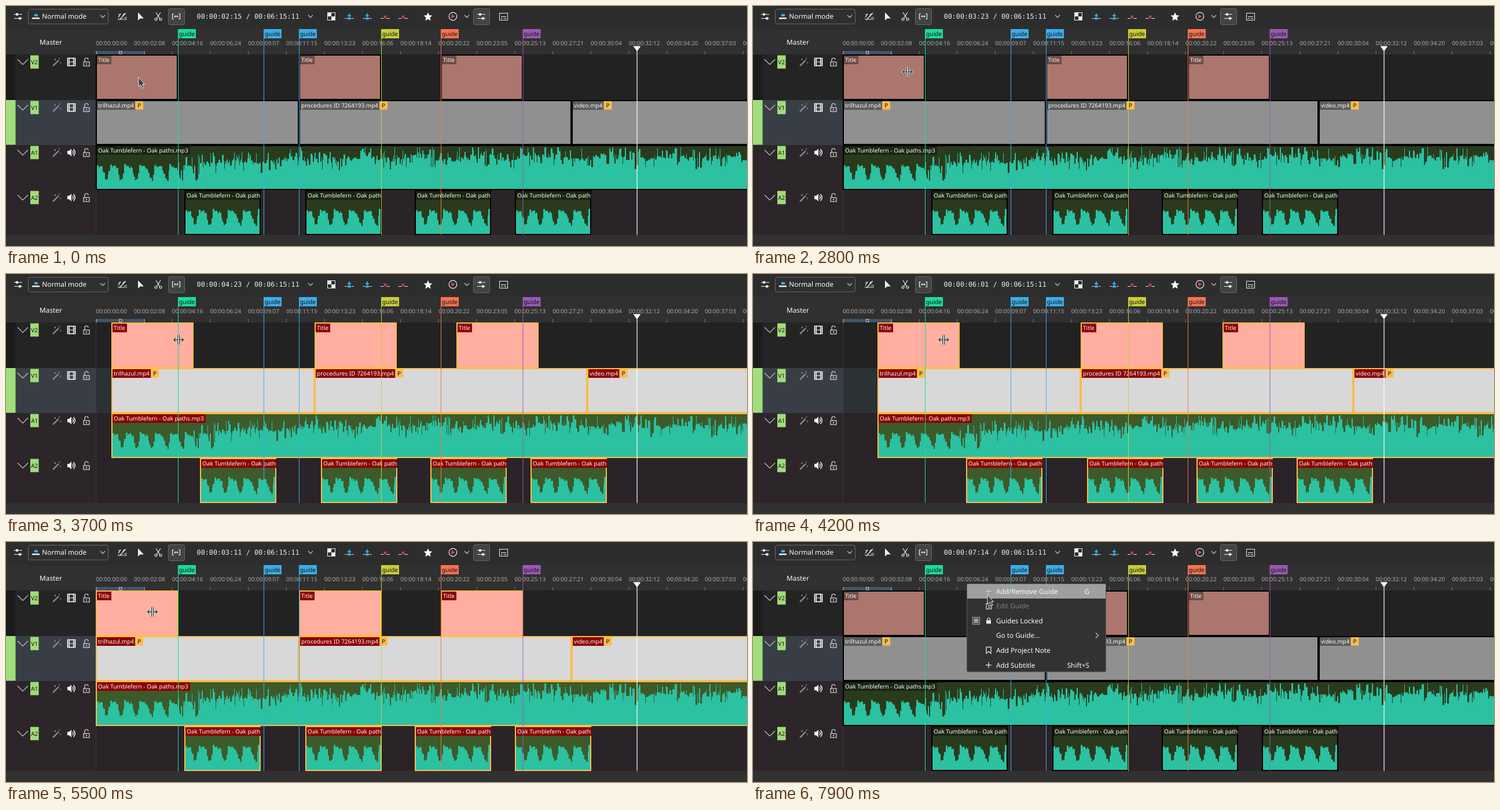
An HTML page for the animation above (8 s loop, 1280 by 416 pixels).

```html
<!DOCTYPE html>
<html lang="en">
<head>
<meta charset="utf-8">
<title>Timeline spacer tool</title>
<style>
html, body { margin: 0; width: 100%; height: 100%; overflow: hidden; background: #2d2d2d; }
#stage { display: block; width: 1280px; height: 416px; }
text { font-family: "Noto Sans", "Open Sans", sans-serif; font-size: 10px; fill: #fcfcfc; text-rendering: geometricPrecision; white-space: pre; }
.ui { font-size: 11.8px; }
.mono { font-family: "DejaVu Sans Mono", "Noto Sans Mono", monospace; font-size: 11.75px; fill: #eee; }
.dark { fill: #111; }
.line { fill: none; stroke: #eee; stroke-width: 1.2; }
.ruler text { fill: #a9a9a9; }
.edge { fill: none; stroke: #000; stroke-width: 2; }
.title { fill: #ab766d; }
.video { fill: #909090; }
.audio { fill: #293b1c; }
.tag { fill: #000; fill-opacity: .36; }
.wave { fill: #2bc1a1; }
.sel .edge { stroke: #fdbc4b; }
.sel .title { fill: #ffae9f; }
.sel .video { fill: #d8d8d8; }
.sel .audio { fill: #3d5a2a; }
.sel .tag { fill: #8b0000; fill-opacity: 1; }
</style>
</head>
<body>
<svg id="stage" viewBox="0 0 1280 416">
  <g id="back"></g>
  <g id="clips"></g>
  <g id="front"></g>
  <g id="menu"></g>
  <g id="arrow"><path d="M.5 .5V17L4.4 13.6L7.3 19.6L9.7 18.4L7 12.6H11Z" fill="#3d3d3d" stroke="#eee" stroke-linejoin="round"/></g>
  <g id="split"></g>
</svg>
<script>
const $ = id => document.getElementById(id);
const rect = (x, y, w, h, fill, more = '') => `<rect x="${x}" y="${y}" width="${w}" height="${h}" fill="${fill}" ${more}/>`;
const text = (x, y, s, cls = '', more = '') => `<text x="${x}" y="${y}" class="${cls}" ${more}>${s}</text>`;
const line = (d, color = '#eee', w = 1.2) => `<path d="${d}" class="line" style="stroke:${color};stroke-width:${w}"/>`;
const shape = (d, fill = '#eee') => `<path d="${d}" fill="${fill}"/>`;
const at = (x, y, s) => `<g transform="translate(${x} ${y})">${s}</g>`;
const chevron = (x, y, r = 4) => line(`M${x - r} ${y - r / 2}l${r} ${r}l${r} ${-r}`, '#ccc');
const two = n => String(n).padStart(2, '0');
const timecode = f => `00:00:${two(Math.floor(f / 25))}:${two(f % 25)}`;

// Toolbar
const sliders = line('M-7-3.5H7M-7 3.5H7') + rect(-4, -5.5, 4, 4, '#eee') + rect(1, 1.5, 4, 4, '#eee');
const checked = x => rect(x + .5, 4.5, 28, 28, '#434343', 'rx="3" stroke="#666"');
const arrowDown = color => line('M-7.5 3.5H-4M4 3.5H7.5') + rect(-3, 2, 6, 3.5, color) + shape('M-4-2H4L0 1.5Z', color) + rect(-1, -5, 2, 4, color);
const redCut = line('M-8 3.5H-3M3 3.5H8') + line('M-2.5-1.5L2.5 3.5M2.5-1.5L-2.5 3.5', '#e04a5a', 1.5);
const spacer = line('M-4-4.5H-6.5V4.5H-4M4-4.5H6.5V4.5H4M-2.5 0H2.5') + shape('M-4 0l2.5-2.5v5zM4 0l-2.5-2.5v5z');

function toolbar() {
  return at(21, 18, sliders)
    + rect(38.5, 5.5, 138, 25.5, '#2f2f2f', 'rx="3" stroke="#6b6b6b"')
    + rect(45, 20, 13, 2.5, '#eee') + rect(49, 14, 6, 4, '#3daee9')
    + text(62.3, 22.3, 'Normal mode', 'ui') + chevron(167, 18)
    + at(201, 18, line('M-8 5H8M-7 2L-3-5M-1 2L3-5M-5 6L6-6M-7-3H-3M3 2H8'))
    + at(228, 11, shape('M0 0V14L4 10.5H10Z'))
    + at(263, 18, line('M-4-7L3 4M4-7L-3 4') + '<circle cx="-4" cy="5" r="2" class="line"/><circle cx="4" cy="5" r="2" class="line"/>')
    + checked(280) + rect(280, 4, 29, 29, '#b0b0b0', 'id="hover" rx="3"') + at(294, 18, spacer)
    + `<text id="clock" class="mono" x="329.6" y="22.4"></text>` + text(414.8, 22.4, '/ 00:06:15:11', 'mono')
    + chevron(526, 18)
    + rect(555.5, 11.5, 13, 13, 'none', 'stroke="#eee"') + shape('M555 11h7v7h-7zM562 18h7v7h-7z')
    + at(593, 18, arrowDown('#3daee9')) + at(624, 18, arrowDown('#3daee9'))
    + at(655, 18, redCut) + at(686, 18, redCut)
    + at(729, 18.5, shape('M0-7.5L2.2-2.5L7.4-2L3.5 1.6L4.6 7L0 4.2L-4.6 7L-3.5 1.6L-7.4-2L-2.2-2.5Z', '#fff'))
    + '<circle cx="772" cy="18" r="6.8" class="line"/>' + shape('M769.5 14.5v7l6-3.5z', '#e04a5a') + chevron(796, 18)
    + checked(807) + at(821, 18, sliders)
    + rect(852.5, 12.5, 14, 12, 'none', 'stroke="#eee"') + line('M855 18.5H864M855 21.5H858M860 21.5H864');
}

// Track headers
const wand = line('M-6 7L4-3', '#8f8f8f', 2.4) + line('M-2-6v3M7 0v3M6-7l-2 2M-4-4h3', '#8f8f8f');
const film = rect(-6.5, -6.5, 13, 13, 'none', 'stroke="#fcfcfc" stroke-width="1.6"') + line('M-3.5-6V6M3.5-6V6M-6-3h2M-6 0h2M-6 3h2M4-3h2M4 0h2M4 3h2M-3 0H3', '#fcfcfc', 1.2);
const speaker = shape('M-7-3H-4L0-6.5V6.5L-4 3H-7Z', '#fcfcfc') + line('M2-3Q4.5 0 2 3M3.5-6Q9 0 3.5 6', '#fcfcfc', 1.4);
const lock = rect(-5, 0, 10, 7, 'none', 'stroke="#ddd" stroke-width="1.2"') + line('M-3 0V-4Q-3-7 0-7T3-4', '#ddd') + rect(-.7, 2, 1.5, 3, '#ddd');

const tracks = [
  ['V2', 84, 79, '#242424', '#222222', 97],
  ['V1', 163, 78, '#393e46', '#2a3235', 176],
  ['A1', 241, 78, '#2c2529', '#2a2328', 254],
  ['A2', 319, 78, '#2c2529', '#2a2328', 332],
];

function header([name, y, h, head, body, mid]) {
  return rect(0, y, 155, h, head) + rect(155, y, 1125, h, body)
    + rect(42, mid - 11.5, 14.5, 23, '#9fdd79') + text(49.2, mid + 3.5, name, 'dark', 'text-anchor="middle"')
    + line(`M20 ${mid - 4.5}l9 9l9-9`, '#c4c4c4')
    + at(87, mid, wand) + at(113, mid, name[0] === 'V' ? film : speaker) + at(139, mid, lock);
}

const step = 65.75;
function ruler() {
  let s = '';
  for (let i = 0; i < 18; i++) {
    const x = 155.5 + i * step;
    s += rect(x - .5, 78, 1, 6, '#777') + text(x - .3, 67.8, timecode(i * 58));
  }
  return `<g class="ruler">${s}</g>` + rect(156, 78, 84, 5.5, '#40566a') + rect(156, 78, 1, 6, '#6f93b5') + rect(238.5, 78, 1.5, 6, '#6f93b5')
    + rect(195.5, 78.5, 4.5, 4.5, '#40566a', 'stroke="#bcc8d2"');
}

$('back').innerHTML = rect(0, 0, 1280, 416, '#2d2d2d') + rect(0, 40, 1280, 44, '#303030') + toolbar()
  + text(77.5, 66.8, 'Master', 'ui', 'text-anchor="middle"') + tracks.map(header).join('')
  + rect(0, 84, 16.5, 79, '#1b1b1b') + rect(0, 163, 16.5, 77.5, '#a0df7c')
  + rect(155, 84, 1, 313, '#3c3a3c') + ruler() + rect(0, 397, 1280, 19, '#313131');

// Waveform: slow pulses with slanted notches first, then a dense spiky passage
function pulse(x) {
  const p = ((x + 4) % 26) / 26;
  if (p < .5) return 42 - p * 8;
  if (p < .72) return 38 - (p - .5) * 95;
  if (p < .88) return 17;
  return 17 + (p - .88) * 190;
}

function wave(width, bottom) {
  let seed = 4711, d = `M0 ${bottom}`;
  const rnd = () => (seed = seed * 16807 % 2147483647) / 2147483647;
  for (let x = 0; x < width;) {
    const r = rnd(), n = rnd() - .5;
    let h = pulse(x) + n * 5;
    if (x > 138 && r > .7) h += 16;
    if (x > 174) {
      h = 46 + 9 * Math.min(1, (x - 174) / 350) + 3 * Math.sin(x / 17) + n * 10;
      if (r < .25) h += 5 + r * 50;
      if (r > .84) h -= 13;
    }
    x += 1 + Math.floor(rnd() * 2.6);
    d += `V${(bottom - Math.min(h, 73)).toFixed(1)}H${Math.min(x, width)}`;
  }
  return `<path class="wave" d="${d}V${bottom}Z"/>`;
}

// Clips: kind, x, y, width, height, label
const song = 'Oak Tumblefern - Oak paths.mp3';
const clips = [
  ...[156, 507, 752].map(x => ['title', x, 85, 140, 77, 'Title']),
  ['video', 156, 164, 349, 76, 'trilhazul.mp4'],
  ['video', 507, 164, 469, 76, 'procedures ID 7264193.mp4'],
  ['video', 978, 164, 400, 76, 'video.mp4'],
  ['audio', 156, 242, 1200, 76, song],
  ...[309, 518, 707, 880].map(x => ['audio', x, 320, 130, 76, song]),
];

$('clips').innerHTML = clips.map(([kind, x, y, w, h, label]) =>
  `<svg x="${x - 1}" y="${y - 1}" width="${w + 2}" height="${h + 2}">`
  + `<rect class="${kind}" x="1" y="1" width="${w}" height="${h}"/>`
  + (kind === 'audio' ? at(1, 1, wave(w, h)) : '')
  + `<rect class="edge" x="1" y="1" width="${w}" height="${h}"/>`
  + `<rect class="tag" x="2" y="2" height="15"/>` + text(4, 12.7, label)
  + (kind === 'video' ? `<g class="badge">${rect(0, 2, 14, 14.5, '#fdbc4b') + text(4, 12.7, 'P', 'dark')}</g>` : '')
  + '</svg>').join('');

for (const clip of $('clips').children) {
  const w = clip.querySelector('text').getComputedTextLength() + 5;
  clip.querySelector('.tag').setAttribute('width', w);
  clip.querySelector('.badge')?.setAttribute('transform', `translate(${w + 1} 0)`);
}

// Guides and playhead
const guides = [
  [297, '#1cdc9a'], [445, '#3daee9'], [506, '#3daee9'],
  [648, '#c9ce3b'], [751, '#f67450'], [892.5, '#9b59b6'],
];
$('front').innerHTML = guides.map(([x, color]) =>
  rect(x, 56, 1, 341, color) + rect(x, 40, 31, 16, color) + text(x + 1.7, 51.5, 'guide', 'dark', 'style="font-size:10.3px"')).join('')
  + rect(1089.5, 76, 1.2, 321, '#fff') + shape('M1083.5 69.5h13l-6.5 9z', '#fff');

// Context menu
const plus = color => line('M-5 0H5M0-5V5', color);
const lockIcon = rect(-4, -1, 8, 6, '#eee') + line('M-2.5-1V-3Q0-7 2.5-3V-1');
const editIcon = line('M-4-5V5H5V-1M-4-4H0M-1-1H3M-1 2H3', '#b5b5b5', 1.6);
const noteIcon = line('M-4-5.5H4V5.5L0 2L-4 5.5Z');
const items = [
  ['Add/Remove Guide', plus('#ccc'), 'G'], ['Edit Guide', editIcon], ['Guides Locked', lockIcon],
  ['Go to Guide...', ''], ['Add Project Note', noteIcon], ['Add Subtitle', plus('#eee'), 'Shift+S'],
];
$('menu').innerHTML = rect(369.5, 72.5, 240, 152.5, '#323232', 'rx="2" stroke="#585858"')
  + rect(370, 73, 239, 25, '#9f9f9f', 'id="lit"')
  + items.map(([label, icon, key = ''], i) => {
    const y = 85.3 + i * 25.6;
    return at(407, y, icon) + text(420, y + 4.3, label, 'ui', i === 1 ? 'style="fill:#7c7c7c"' : '')
      + text(581, y + 4.3, key, 'ui', 'text-anchor="end"');
  }).join('')
  + rect(379.5, 130.5, 12, 12, '#323232', 'stroke="#b5b5b5"') + rect(381.5, 132.5, 8, 8, '#a0a0a0')
  + line('M592 157.5l4.5 4.5l-4.5 4.5', '#ccc');

const splitPath = 'M-1.5-8.5V8.5M1.5-8.5V8.5M-8.5 0H-2M8.5 0H2M-5.5-3L-8.5 0L-5.5 3M5.5-3L8.5 0L5.5 3';
$('split').innerHTML = line(splitPath, '#f4f4f4', 3) + line(splitPath, '#333', 1.4);

// Motion: [ms, value] with straight runs between
const cursorX = [[300, 228.5], [1300, 293], [2200, 293], [2400, 274.5], [2700, 274.5], [2800, 267], [3200, 267], [4300, 335.5],
  [4600, 335.5], [5500, 253], [5800, 253], [6800, 369], [7700, 369], [7900, 404.5]];
const cursorY = [[300, 123], [1300, 23], [2200, 23], [2400, 76], [2700, 76], [2800, 114], [4600, 114], [5500, 121],
  [5800, 121], [6800, 71.5], [7700, 71.5], [7900, 91]];
const frames = [[300, 65], [1200, 117], [2200, 117], [2400, 103], [2700, 103], [2800, 98], [3200, 98], [3700, 123], [4300, 157],
  [4700, 157], [4900, 147], [5500, 86], [5800, 86], [6800, 189]];
const shift = [[3200, 0], [3700, 27.2], [4000, 45.5], [4300, 66.7], [4900, 66.7], [5400, 4], [5500, 0]];
const hover = [[1200, 0], [1400, 1], [2200, 1], [2400, 0]];
const menuFade = [[7000, 0], [7300, 1]];

function value(keys, t) {
  const i = keys.findIndex(k => k[0] > t);
  if (i < 0) return keys[keys.length - 1][1];
  if (i === 0) return keys[0][1];
  const [t0, a] = keys[i - 1], [t1, b] = keys[i];
  return a + (b - a) * (t - t0) / (t1 - t0);
}

function draw() {
  const t = Math.floor(performance.now() % 8000 / 100) * 100;
  const splitting = t >= 2800 && t < 6600;
  const place = `translate(${value(cursorX, t)} ${value(cursorY, t)})`;
  for (const [id, on] of [['arrow', !splitting], ['split', splitting]]) {
    $(id).setAttribute('transform', place);
    $(id).style.display = on ? '' : 'none';
  }
  $('clips').setAttribute('class', t >= 3200 && t < 5900 ? 'sel' : '');
  $('clips').setAttribute('transform', `translate(${Math.round(value(shift, t))} 0)`);
  $('clock').textContent = timecode(Math.round(value(frames, t)));
  $('hover').style.opacity = value(hover, t);
  $('menu').style.opacity = value(menuFade, t);
  $('lit').style.opacity = t >= 7800 ? 1 : 0;
  requestAnimationFrame(draw);
}
draw();
</script>
</body>
</html>
```
